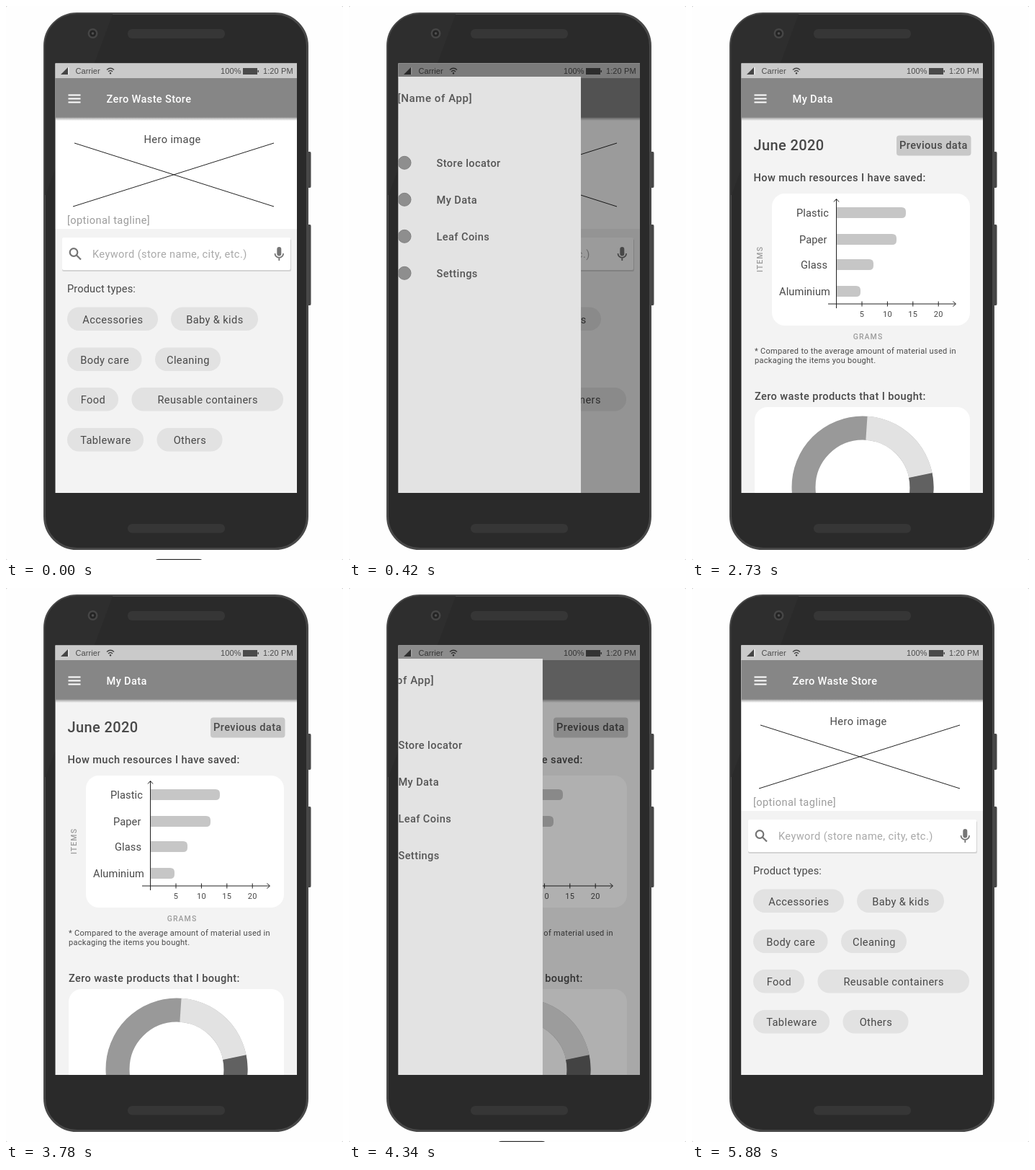
An HTML page for the animation above (5.95 s loop, 468 by 768 pixels).

```html
<!DOCTYPE html>
<html lang="en">
<head>
<meta charset="utf-8">
<title>App prototype</title>
<style>
  html, body { margin: 0; width: 100%; height: 100%; overflow: hidden; background: #fff; }
  svg { display: block; width: 468px; height: 768px; }
  text { font: 14.6px Roboto, sans-serif; letter-spacing: .4px; fill: #484848; }
  .medium { font-weight: 500; }
  .title { font-weight: 500; fill: #fff; letter-spacing: .35px; }
  .status { font: 11px "Liberation Sans", Arial, sans-serif; letter-spacing: .1px; fill: #4a4a4a; }
  .hint { fill: #9c9c9c; }
  .tight { letter-spacing: .12px; }
  .small { font-size: 11px; letter-spacing: .3px; }
  .axis { font-size: 10.5px; font-weight: 500; letter-spacing: 1.1px; fill: #9c9c9c; }
  .mid { text-anchor: middle; }
  .line { fill: none; stroke: #222; }
</style>
</head>
<body>
<svg viewBox="0 0 468 768">
  <defs>
    <clipPath id="screen"><rect x="68.5" y="79.5" width="335.5" height="595.5"/></clipPath>
    <clipPath id="body"><rect x="54" y="11" width="364" height="741" rx="44"/></clipPath>
    <linearGradient id="shade" x2="0" y2="1">
      <stop stop-color="#777" stop-opacity=".75"/><stop offset="1" stop-color="#777" stop-opacity="0"/>
    </linearGradient>

    <g id="bar">
      <rect x="68" y="79" width="336" height="21" fill="#cacaca"/>
      <path d="M76 95L86 85V95Z" fill="#444"/><path d="M86 85h1.5v10h-1.5z" fill="#eee"/>
      <text class="status" x="96.5" y="94">Carrier</text>
      <g class="line" style="stroke:#444" stroke-width="1.4">
        <path d="M140 88.5q5-4.5 10 0M142 91q3-2.8 6 0"/><circle cx="145" cy="93.2" r=".6"/>
      </g>
      <text class="status" x="298" y="94">100%</text>
      <path d="M329 86h20v9h-20zM349.500 89h1.500v3h-1.500z" fill="#4a4a4a"/>
      <text class="status" x="357" y="94">1:20 PM</text>
      <rect x="68" y="154" width="336" height="5" fill="url(#shade)"/>
      <rect x="68" y="100" width="336" height="54.500" fill="#868686"/>
      <path d="M86.500 123.500h17M86.500 128.500h17M86.500 133.500h17" stroke="#fff" stroke-width="2"/>
    </g>

    <g id="home">
      <rect x="68" y="79" width="336" height="230" fill="#fff"/>
      <rect x="68" y="309" width="336" height="367" fill="#f3f3f3"/>
      <use href="#bar"/>
      <text class="title" x="139.500" y="133.500">Zero Waste Store</text>
      <path class="line" d="M95 190L372 278M93 278L372 190"/>
      <text x="191.500" y="190">Hero image</text>
      <text class="hint" x="85" y="302">[optional tagline]</text>
      <rect x="78" y="323" width="318" height="45" rx="2" fill="#d4d4d4"/>
      <rect x="78" y="321" width="317" height="45" rx="2" fill="#fff"/>
      <g fill="none" stroke="#757575" stroke-width="2.200">
        <circle cx="94" cy="341.500" r="5.300"/><path d="M98 345.500l6 6"/>
        <path d="M373.500 343a5.800 5.800 0 0 0 11.600 0M379.300 349v4" stroke-width="1.800"/>
      </g>
      <rect x="376.300" y="334" width="6" height="12.500" rx="3" fill="#757575"/>
      <text style="fill:#a9a9a9" x="120" y="349">Keyword (store name, city, etc.)</text>
      <text class="tight" x="85" y="397">Product types:</text>
      <g id="chips"></g>
    </g>

    <g id="data">
      <rect x="68" y="79" width="336" height="597" fill="#f3f3f3"/>
      <use href="#bar"/>
      <text class="title" x="139.500" y="133.500">My Data</text>
      <text class="medium" style="font-size:20px" x="85.500" y="200">June 2020</text>
      <rect x="284" y="179.500" width="103.500" height="28" rx="4" fill="#c8c8c8"/>
      <text class="medium" x="288" y="198">Previous data</text>
      <text class="medium" x="85.500" y="243">How much resources I have saved:</text>
      <rect x="111" y="260" width="275" height="183" rx="18" fill="#fff"/>
      <g id="bars"></g>
      <path class="line" d="M200.500 419V268M197 271.500l3.500-4 3.500 4M189 413h177M362.500 409.500l4 3.500-4 3.500"/>
      <g id="ticks"></g>
      <text class="axis mid" transform="translate(97.500 351) rotate(-90)">ITEMS</text>
      <text class="axis mid" x="244.500" y="461.500">GRAMS</text>
      <text class="small" x="87" y="482">* Compared to the average amount of material used in</text>
      <text class="small" x="87" y="495">packaging the items you bought.</text>
      <text class="medium" x="87" y="545.500">Zero waste products that I bought:</text>
      <rect x="87" y="556" width="299" height="140" rx="18" fill="#fff"/>
      <g fill="none" stroke-width="33" transform="translate(237 667)">
        <circle r="82" stroke="#999"/>
        <circle r="82" stroke="#e2e2e2" pathLength="360" stroke-dasharray="75 285" transform="rotate(-86.200)"/>
        <circle r="82" stroke="#616161" pathLength="360" stroke-dasharray="90 270" transform="rotate(-11.500)"/>
      </g>
    </g>
  </defs>

  <rect width="468" height="768" fill="#c4c4c4"/>
  <rect width="468" height="768" rx="2.500" fill="#fefefe"/>
  <path d="M418 202h4q1.500 0 1.500 2v46q0 2-1.500 2h-4zM418 303h4q1.500 0 1.500 2v108q0 2-1.500 2h-4z" fill="#464646"/>
  <rect x="53.500" y="10.500" width="365" height="742" rx="45" fill="#2a2a2a" stroke="#484848" stroke-width="3"/>
  <path d="M52 9H149L55 262H52Z" fill="#2e2e2e" clip-path="url(#body)"/>
  <g fill="#363636">
    <rect x="169" y="32" width="135" height="13" rx="6"/>
    <rect x="169" y="718" width="135" height="12.500" rx="6"/>
  </g>
  <circle cx="120.500" cy="38" r="7" fill="#464646"/>
  <circle cx="120.500" cy="38" r="4.500" fill="#242424"/>
  <circle cx="120.500" cy="38" r="1.800" fill="#505050"/>

  <g clip-path="url(#screen)">
    <use id="page"/>
    <rect id="dim" x="68" y="79" width="336" height="597"/>
    <g id="drawer">
      <rect x="68" y="98" width="272" height="578" fill="#e3e3e3"/>
      <text class="medium" style="font-size:15px;letter-spacing:.6px;fill:#555" x="85.500" y="133">[Name of App]</text>
      <g id="menu"></g>
    </g>
    <use id="nextPage"/>
  </g>
  <rect id="toast" x="204" y="766.800" width="72" height="20" rx="8" fill="#333"/>
</svg>

<script>
const $ = id => document.getElementById(id);
const fill = (id, items, draw) => { $(id).innerHTML = items.map(draw).join(''); };

fill('chips', [
  ['Accessories', 85, 417.5, 126], ['Baby &amp; kids', 229, 417.5, 121],
  ['Body care', 85, 473.5, 103.5], ['Cleaning', 207, 473.5, 91],
  ['Food', 85, 529, 71], ['Reusable containers', 174.5, 529, 210.5],
  ['Tableware', 85, 585, 106], ['Others', 209.5, 585, 91]
], ([label, x, y, w]) =>
  `<rect x="${x}" y="${y}" width="${w}" height="32.500" rx="16" fill="#e2e2e2"/>
   <text class="mid" x="${x + w / 2 + .4}" y="${y + 22.3}">${label}</text>`);

fill('bars', [
  ['Plastic', 145, 279, 96], ['Paper', 149, 316, 83],
  ['Glass', 151, 351, 51], ['Aluminium', 121, 388, 33]
], ([label, x, y, w]) =>
  `<path d="M201 ${y}h${w - 6}q6 0 6 6v3q0 6 -6 6h${6 - w}z" fill="#c6c6c6"/>
   <text class="tight" x="${x}" y="${y + 13}">${label}</text>`);

fill('ticks', [5, 10, 15, 20], (value, i) => {
  const x = 236 + i * 35.4;
  return `<path class="line" d="M${x} 409.500v7"/>
    <text class="small mid" x="${x}" y="431">${value}</text>`;
});

fill('menu', ['Store locator', 'My Data', 'Leaf Coins', 'Settings'], (label, i) => {
  const y = 217.3 + i * 51;
  return `<circle cx="95" cy="${y}" r="9" fill="#8e8e8e" stroke="#808080"/>
    <text class="medium" style="fill:#555" x="139.500" y="${y + 5.5}">${label}</text>`;
});

const LOOP = 5950, STEP = 354, DRAWER = 271;
const SWITCH = 1890 + STEP; // data page fully shown
const toastTimes = [[0, 400], [3990, 4400], [5460, 5870]];
const easeIn = (t, start) => Math.min(1, Math.max(0, (t - start) / STEP)) ** 1.7;

function render(now) {
  const t = now % LOOP;
  const first = t < SWITCH;
  const open = easeIn(t, first ? 81 : 4045);
  const fade = easeIn(t, first ? 1890 : 5520);
  $('page').setAttribute('href', first ? '#home' : '#data');
  $('nextPage').setAttribute('href', first ? '#data' : '#home');
  $('nextPage').setAttribute('opacity', fade);
  $('dim').setAttribute('opacity', .42 * open);
  $('drawer').setAttribute('transform', `translate(${(open - 1) * DRAWER - (open ? 0 : 2)} 0)`);
  $('toast').setAttribute('opacity', +toastTimes.some(([a, b]) => t >= a && t < b));
}

const begin = performance.now();
(function tick() {
  render(performance.now() - begin);
  requestAnimationFrame(tick);
})();
</script>
</body>
</html>
```
